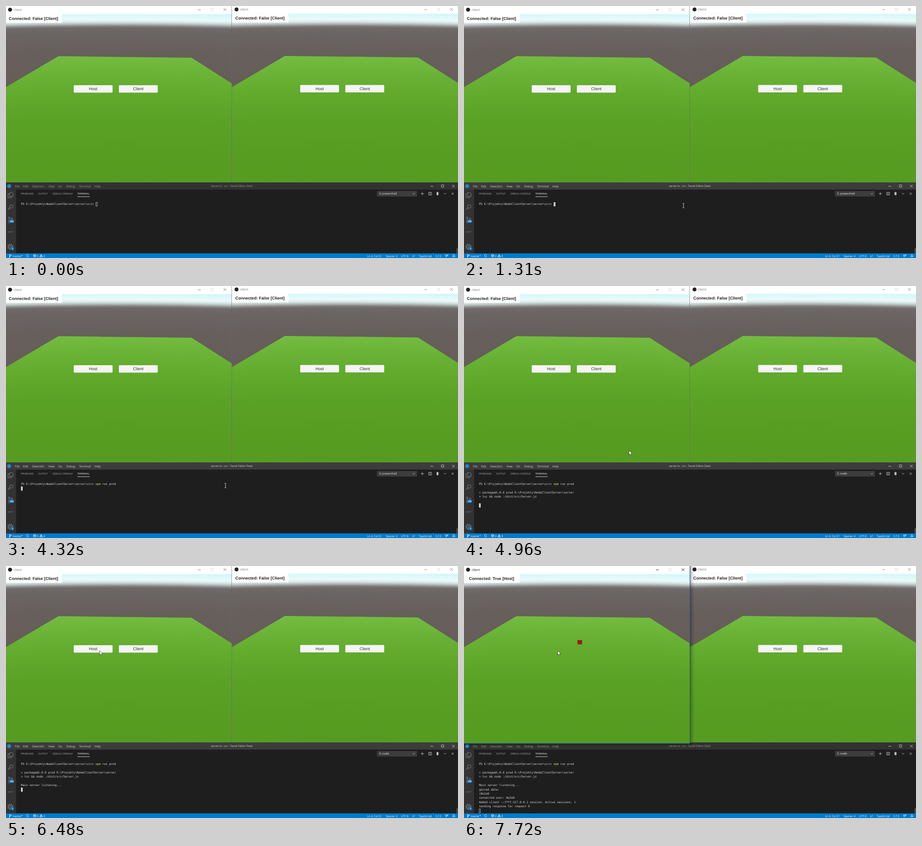
An HTML page that plays this animation: 1001x560 px, repeating every 8000 ms.

```html
<!DOCTYPE html>
<html lang="en">
<head>
<meta charset="utf-8">
<title>Client and server</title>
<style>
html, body { margin: 0; width: 100%; height: 100%; overflow: hidden; background: #1e1e1e; }
svg { display: block; }
text { text-rendering: geometricPrecision; white-space: pre; }
.ui { font-family: "Open Sans", "Noto Sans", sans-serif; }
.game { font-family: "Liberation Sans", Arial, sans-serif; }
.mono { font-family: "DejaVu Sans Mono", monospace; font-size: 6.245px; fill: #dedede; }
.line { fill: none; stroke: currentColor; stroke-width: 0.9; }
</style>
</head>
<body>
<svg id="stage" width="100%" height="100%" viewBox="0 0 1001 560"></svg>
<script>
const LOOP = 8000;
const CELL = 3.76, ROW = 9.4, LEFT = 33.2, TOP = 436;
const stage = document.getElementById('stage');
const el = id => document.getElementById(id);

const rect = (x, y, w, h, fill, more = '') =>
  `<rect x="${x}" y="${y}" width="${w}" height="${h}" fill="${fill}" ${more}/>`;
const label = (x, y, size, fill, str, more = 'class="ui"') =>
  `<text x="${x}" y="${y}" font-size="${size}" fill="${fill}" ${more}>${str}</text>`;
const icon = (d, color = '#c5c5c5', more = '') =>
  `<path class="line" d="${d}" color="${color}" ${more}/>`;

// Slightly arched vertical gradient; stops are [y, colour] pairs.
const arched = (id, stops) =>
  `<radialGradient id="${id}" gradientUnits="userSpaceOnUse" cx="0" cy="0" r="1"
    gradientTransform="translate(250 458) scale(2100 440)">` +
  stops.map(([y, c]) => `<stop offset="${(458 - y) / 440}" stop-color="${c}"/>`).join('') +
  '</radialGradient>';

const fade = (id, x2, y2) =>
  `<linearGradient id="${id}" x2="${x2}" y2="${y2}">
    <stop stop-color="#000" stop-opacity=".42"/>
    <stop offset=".4" stop-color="#000" stop-opacity=".14"/>
    <stop offset="1" stop-color="#000" stop-opacity="0"/></linearGradient>`;

const defs = '<defs>' +
  arched('sky', [[394, '#655c57'], [180, '#665d58'], [110, '#665f5b'], [60, '#6a6463'],
    [48, '#706b6a'], [44, '#8a8988'], [40, '#b3bcbc'], [35, '#dce9e9'], [30, '#ebfafa'], [18, '#d3f8fb']]) +
  arched('grass', [[394, '#569b21'], [320, '#579d22'], [250, '#5aa225'],
    [190, '#62ab2d'], [150, '#6ab336'], [111, '#73bc40']]) +
  fade('shadeRight', 1, 0) + fade('shadeDown', 0, 1) +
  `<radialGradient id="glow"><stop offset=".55" stop-color="#fff02a" stop-opacity=".8"/>
    <stop offset="1" stop-color="#fff02a" stop-opacity="0"/></radialGradient></defs>`;

const button = (x, str) =>
  rect(x, 176, 86, 16.6, '#f5f5f5', 'rx="1.6"') +
  label(x + 43, 187.4, 9, '#2f2f2f', str, 'class="game" text-anchor="middle"');

function client(id) {
  return rect(-3, 0, 510, 18.6, '#fff') +
    '<circle cx="9" cy="8.2" r="4.4" fill="#222"/>' +
    `<g id="${id}Title" color="#777" fill="#777">` +
    label(17, 11, 7.2, 'inherit', 'client').replace(' fill="inherit"', '') +
    '<path class="line" d="M425 8.6h6.4M482 5.2l6 6m0-6l-6 6"/></g>' +
    icon('M453.5 5.5h5.6v5.6h-5.6z', '#d8d8d8') +
    rect(-3, 18, 510, 380, 'url(#sky)') +
    '<path d="M-3 182L0 180.2L116 111.5L411 115L500 172L507 176.5V398H-3Z" fill="url(#grass)"/>' +
    rect(-3, 18, 127, 19.2, '#fff') +
    label(61, 31, 9.07, '#222', 'Connected: False [Client]',
      `id="${id}Status" class="game" font-weight="700" text-anchor="middle"`) +
    `<g id="${id}Menu">${button(150, 'Host')}${button(250, 'Client')}</g>` +
    `<g id="${id}Cube" visibility="hidden">${rect(251.3, 165.2, 10.2, 9, '#a31b22')}
      ${rect(251.3, 165.2, 10.2, 2, '#7d1a1c')}</g>`;
}

function editor() {
  const menu = [['File', 20], ['Edit', 38], ['Selection', 58], ['View', 94], ['Go', 116],
    ['Debug', 133.3], ['Terminal', 161.8], ['Help', 196]];
  const tabs = [['PROBLEMS', 33], ['OUTPUT', 71], ['DEBUG CONSOLE', 103]];
  const status = [['master*', 14.5], ['0', 68.5], ['0', 83], ['Ln 4, Col 21', 800], ['Spaces: 4', 841],
    ['UTF-8', 875], ['LF', 899.5], ['TypeScript', 914], ['3.7.5', 951]];
  const badge = (x, y, w, str) =>
    rect(x - w / 2, y - 3.7, w, 7.4, '#007acc', 'rx="3.7"') +
    label(x, y + 1.7, 4.6, '#fff', str, 'class="ui" font-weight="700" text-anchor="middle"');

  return rect(0, 392, 1001, 168, '#1e1e1e') +
    rect(0, 392, 1001, 16, '#323233', 'id="bar"') +
    '<circle cx="7" cy="400.3" r="4.3" fill="#2489ca"/>' +
    '<g id="barText" class="ui" fill="#a0a0a0" color="#a0a0a0">' +
    menu.map(([s, x]) => `<text x="${x}" y="402.5" font-size="6.35">${s}</text>`).join('') +
    '<text x="500" y="402.4" font-size="6" text-anchor="middle">server.ts - src - Tavrel Editor Desk</text>' +
    '</g>' +
    icon('M940 400.5h6M964.3 397.5h5v5h-5zM988 397.5l5.6 5.6m0-5.6l-5.6 5.6', '#d0d0d0') +
    // activity bar
    rect(0, 408, 22.3, 142, '#333333') +
    icon('M8 414.5h5l2.5 2.5v6.5h-7.5zM8 417.5h-3.5v8.5h7.5v-2.5', '#8c8c8c') +
    '<circle class="line" cx="11.5" cy="445.5" r="3.8" color="#8c8c8c"/>' +
    icon('M8.8 448.4l-4 4.4', '#8c8c8c', 'style="stroke-width:1.2"') +
    '<g color="#8c8c8c"><circle class="line" cx="7" cy="470.5" r="1.7"/><circle class="line" cx="7" cy="480" r="1.7"/>' +
    '<circle class="line" cx="13" cy="473" r="1.7"/><path class="line" d="M7 472.2v6.1q0-2 3-2q3 0 3-1.7"/></g>' +
    badge(12.7, 478.6, 10, '164') +
    [6, 10, 14].map(x => `<circle cx="${x}" cy="502" r=".9" fill="#8c8c8c"/>`).join('') +
    '<g color="#8c8c8c"><circle class="line" cx="10" cy="535" r="4.3"/><circle class="line" cx="10" cy="535" r="1.7"/>' +
    '<circle class="line" cx="10" cy="535" r="5.6" stroke-dasharray="2.2 2.2" style="stroke-width:1.6"/></g>' +
    badge(14.2, 539, 7.4, '1') +
    // panel header
    tabs.map(([s, x]) => label(x, 419, 5.45, '#a9b0b4', s)).join('') +
    label(158, 419, 5.6, '#efefef', 'TERMINAL') + rect(158, 423.3, 27.5, 0.9, '#e7e7e7') +
    rect(821.5, 411, 88.5, 12.4, '#3c3c3c') +
    label(826, 419.4, 6.4, '#f0f0f0', '', 'id="shell" class="ui"') +
    icon('M900.8 415.8l2.4 2.4l2.4-2.4M922 413.6v6.8M918.6 417h6.8M936 414h6.4v6h-6.4zM939.2 414v6' +
      'M969.8 415.8l2.4 2.4l2.4-2.4M986.8 414.8l4.6 4.6m0-4.6l-4.6 4.6') +
    rect(953.6, 415, 4, 5.4, '#c5c5c5') + icon('M952.8 414.6h5.6M954.6 413.5h2') +
    rect(997.6, 538, 3.4, 11.5, '#4b4b4b') +
    // status bar
    rect(0, 549.7, 1001, 10.3, '#007acc') +
    status.map(([s, x]) => label(x, 557.5, 6, '#fff', s)).join('') +
    icon('M8 553.5v4M8 556q3.2 0 3.2-2M45 555a2.7 2.7 0 0 1 5-1.2M50.4 555a2.7 2.7 0 0 1-5 1.2' +
      'M62.3 553.8l2.4 2.4m0-2.4l-2.4 2.4M77.8 552.2l3 5.4h-6zM77.8 554v2' +
      'M973.5 553h4.5v2.5h-2l-1.5 2zM979.5 552l-1 1.6M989 557q1-1 1-2.5q0-2 1.7-2q1.7 0 1.7 2q0 1.5 1 2.5z', '#fff') +
    '<g color="#fff"><circle class="line" cx="63.5" cy="555" r="2.8"/>' +
    '<circle cx="8" cy="552.8" r="1.1" fill="#fff"/><circle cx="8" cy="557.6" r="1.1" fill="#fff"/>' +
    '<circle cx="11.2" cy="553.3" r="1.1" fill="#fff"/></g>' +
    '<g id="terminal" class="mono"></g>' +
    `<rect id="caret" width="${CELL}" height="9"/>`;
}

stage.innerHTML = defs +
  `<svg x="500" y="0" width="501" height="392"><g transform="translate(1.5 -.6)">${client('right')}</g></svg>` +
  editor() +
  `<g id="shadow">${rect(500, 0, 11, 394, 'url(#shadeRight)')}${rect(0, 394, 504, 8, 'url(#shadeDown)')}</g>` +
  `<svg id="leftView" width="500" height="392">${client('left')}</svg>` +
  '<path id="edge" fill="none"/>' +
  '<circle id="click" r="7.5" fill="url(#glow)"/>' +
  '<path id="arrow" d="M0 0V9.6L2.3 7.6L3.9 11L5.6 10.2L4.1 7H7Z" fill="#fff" stroke="#222" stroke-width=".7"/>' +
  '<path id="beam" d="M-2 -4.8h1.4q.6 0 .6 .6v8.4q0 .6 -.6 .6H-2M2 -4.8H.6M2 4.8H.6" fill="none" stroke="#e8e8e8" stroke-width=".9"/>';

// Pointer keys: time, x, y, jumps until the next key (1 = stay put).
const pointerKeys = [
  [300, 848, 541, 8], [930, 526, 451, 1], [1010, 505, 446, 1], [1080, 486, 443.5, 1],
  [4790, 462, 424, 1], [4870, 410, 392, 1], [4960, 365.5, 365.5, 1],
  [5480, 364, 378, 1], [5560, 359, 410, 1], [5640, 354, 440, 1],
  [5790, 319, 396, 6], [6250, 206, 192.5, 1], [6410, 206.5, 190, 1], [6480, 207.3, 188, 1]
];

function pointerAt(t) {
  const i = pointerKeys.findLastIndex(k => k[0] <= t);
  if (i < 0) return null;
  const [t0, x, y, n] = pointerKeys[i];
  const next = pointerKeys[i + 1];
  if (n === 1 || !next) return [x, y];
  const u = Math.floor((t - t0) / (next[0] - t0) * n) / n;
  return [x + (next[1] - x) * u, y + (next[2] - y) * u];
}

const PROMPT = 'PS E:\\Projekty\\NodeClientServer\\server\\src> ';

function terminalAt(t) {
  const typed = t < 1770 ? '' : t < 2320 ? 'npm' : 'npm run prod';
  const lines = [PROMPT + typed];
  if (t < 4320) return { lines, row: 0, col: lines[0].length };
  if (t >= 4790) lines.push('', '> package@1.0.0 prod E:\\Projekty\\NodeClientServer\\server',
    '> tsc && node ./dist/src/Server.js', '');
  if (t >= 5940) lines.push('Main server listening...');
  if (t >= 7640) lines.push('geived data:', '|8e2e0', 'connected user: 8e2e0',
    'Added client ::ffff:127.0.0.1 session. Active sessions: 1', 'sending response for request 0');
  return { lines, row: lines.length, col: 0 };
}

const escapeText = s => s.replace(/&/g, '&amp;').replace(/>/g, '&gt;');
const show = (id, on) => el(id).setAttribute('visibility', on ? 'visible' : 'hidden');

function set(id, attrs) {
  for (const k in attrs) el(id).setAttribute(k, attrs[k]);
}

let shown = '';
function drawTerminal(t, focused) {
  const { lines, row, col } = terminalAt(t);
  const markup = lines.map((s, i) => {
    const body = escapeText(s).replace(/ npm/, ' <tspan fill="#f5f543">npm</tspan>');
    return `<text x="${LEFT}" y="${(TOP + 6.2 + i * ROW).toFixed(1)}">${body}</text>`;
  }).join('');
  if (markup !== shown) el('terminal').innerHTML = shown = markup;
  const inset = focused ? 0 : 0.4;
  set('caret', {
    x: LEFT + col * CELL + inset, y: TOP + row * ROW + inset,
    width: CELL - 2 * inset, height: 9.2 - 2 * inset,
    fill: focused ? '#d4d4d4' : 'none', stroke: focused ? 'none' : '#c8c8c8', 'stroke-width': 0.8
  });
}

function draw(t) {
  const editing = t >= 1160 && t < 7420;
  const playing = t >= 7420;
  const hosting = t >= 7720;

  set('bar', { fill: editing ? '#3c3c3c' : '#323233' });
  set('barText', { fill: editing ? '#d4d4d4' : '#a0a0a0' });
  el('shell').textContent = t < 4400 ? '3: powershell' : '3: node';
  drawTerminal(t, editing);

  const ink = playing ? '#111' : '#777';
  set('leftTitle', { fill: ink, color: ink });
  set('leftView', { height: playing ? 394 : 392 });
  set('edge', playing
    ? { d: 'M500.2 0V394.2H0', stroke: '#22699c', 'stroke-width': 1 }
    : { d: 'M499.8 0V392', stroke: '#6b6b6b', 'stroke-width': 0.7 });
  show('shadow', playing);
  el('leftStatus').textContent = hosting ? 'Connected: True [Host]' : 'Connected: False [Client]';
  show('leftMenu', !hosting);
  show('leftCube', hosting);

  const p = pointerAt(t);
  const overText = p && p[1] > 430;
  show('arrow', p && !overText);
  show('beam', p && overText);
  show('click', (t >= 1160 && t < 1310) || (t >= 7420 && t < 7570));
  if (p) {
    const at = `translate(${p[0]} ${p[1]})`;
    for (const id of ['arrow', 'beam', 'click']) el(id).setAttribute('transform', at);
  }
}

const start = performance.now();
function tick() {
  draw((performance.now() - start) % LOOP);
  requestAnimationFrame(tick);
}
tick();
</script>
</body>
</html>
```
